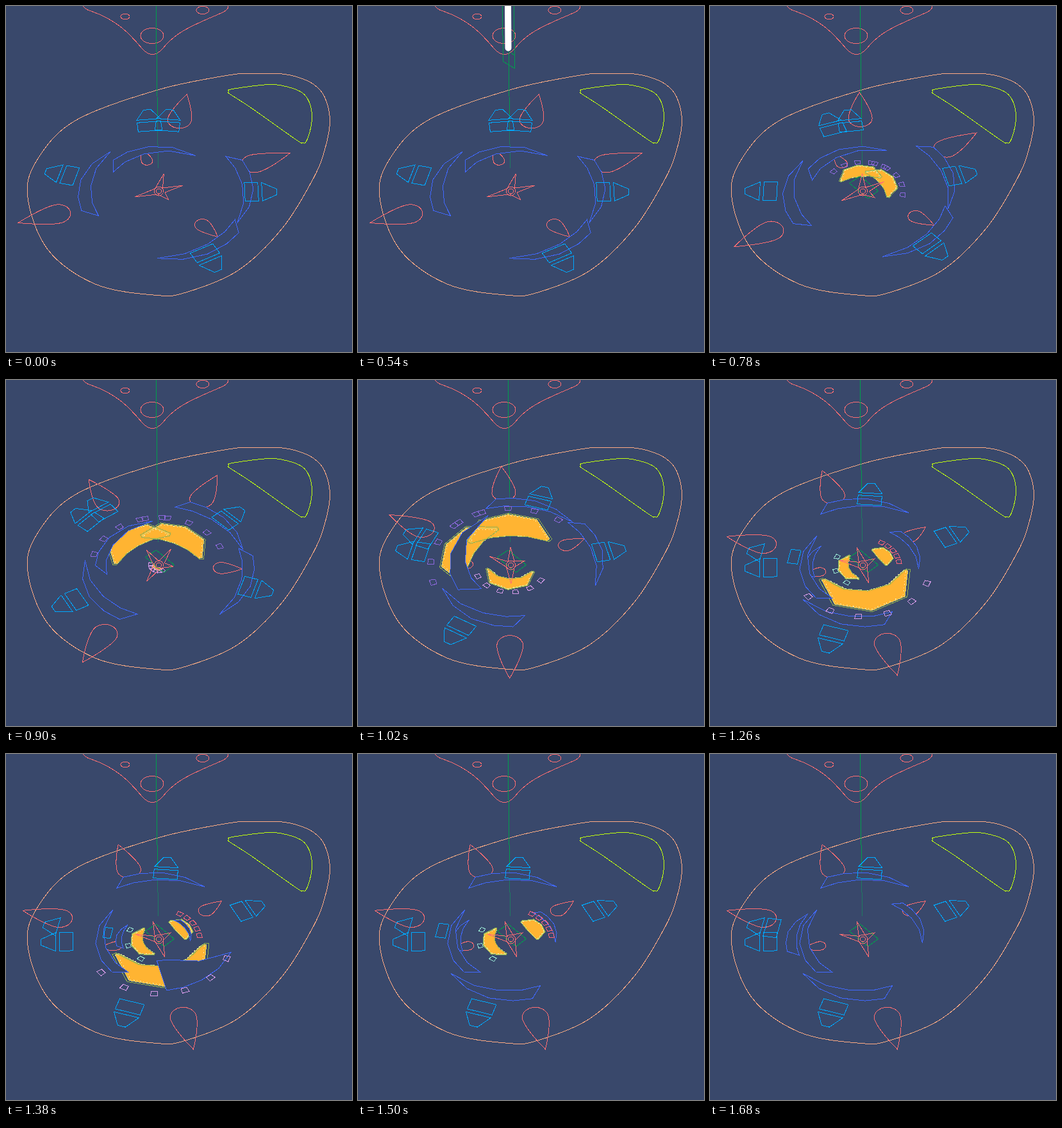
An HTML page for the animation above (2.24 s loop, 540 by 540 pixels).

```html
<!DOCTYPE html>
<html lang="en">
<head>
<meta charset="utf-8">
<title>Ring animation</title>
<style>
html, body { margin: 0; width: 100%; height: 100%; overflow: hidden; background: #39486b; }
svg { display: block; width: 100vw; height: 100vh; }
path, ellipse, circle { fill: none; stroke-width: 1; shape-rendering: crispEdges; }
</style>
</head>
<body>
<svg id="stage" viewBox="-0.5 -0.5 540 540"></svg>
<script>
const LOOP = 2240, START = 540, END = 1680, STEP = 60;
const CX = 238, CY = 288.5, TILT = 0.735, DEPTH = 0.0003;
const BG = '#39486b', ROSE = '#ff6e72', BLUE = '#4169ff', CYAN = '#00a8ff', GREEN = '#00a04c';
const PURPLE = '#8c68dc', PINK = '#d59ae8', MINT = '#94e0d0', RED = '#ff647c';
const stage = document.getElementById('stage');

function add(tag, attrs) {
  const el = document.createElementNS('http://www.w3.org/2000/svg', tag);
  for (const name in attrs) el.setAttribute(name, attrs[name]);
  return stage.appendChild(el);
}
const layer = (stroke, more) => add('path', { stroke, ...more });
const set = (el, d) => el.setAttribute('d', d);
const poly = pts => 'M' + pts.map(p => p[0].toFixed(1) + ' ' + p[1].toFixed(1)).join('L') + 'Z';
const rad = deg => deg * Math.PI / 180;
const mix = (a, b, k) => a + (b - a) * k;
const ramp = (t, from, to) => Math.max(0, Math.min(1, (t - from) / (to - from)));
const bump = (t, peak, width) => Math.max(0, 1 - Math.abs(t - peak) / width);
const smooth = k => k * k * (3 - 2 * k);
const easeOut = k => 1 - (1 - k) ** 2;
const range = n => Array.from({ length: n }, (_, i) => i);

// Closed smooth curve through points
function loopThrough(text) {
  const p = text.split(' ').map(s => s.split(',').map(Number)), n = p.length;
  return p.reduce((d, b, i) => {
    const a = p[(i + n - 1) % n], c = p[(i + 1) % n], e = p[(i + 2) % n];
    return d + 'C' + [b[0] + (c[0] - a[0]) / 6, b[1] + (c[1] - a[1]) / 6,
      c[0] - (e[0] - b[0]) / 6, c[1] - (e[1] - b[1]) / 6, c[0], c[1]];
  }, 'M' + p[0]);
}

// Tilted plane to screen
function project(x, y) {
  const p = 1 + DEPTH * y;
  return [CX + x * p, CY + y * p * TILT];
}
const polar = (r, deg) => project(r * Math.cos(rad(deg)), r * Math.sin(rad(deg)));

// u runs outwards, v sideways, on a spoke at the given angle
function spoke(pts, deg, scale = 1) {
  const c = Math.cos(rad(deg)) * scale, s = Math.sin(rad(deg)) * scale;
  return poly(pts.map(([u, v]) => project(u * c - v * s, u * s + v * c)));
}

// Round inner end, pointed outer end
function teardrop(inner, tip, w) {
  const mid = inner + w, len = tip - mid;
  const cap = range(13).map(i => rad(90 + i * 15)).map(a => [mid + w * Math.cos(a), w * Math.sin(a)]);
  const side = range(9).map(i => (i + 1) / 10).map(k => {
    const j = 1 - k;
    return [mid + len * (0.75 * j * j * k + 2.2 * j * k * k + k ** 3),
      w * (j ** 3 + 3 * j * j * k + 1.2 * j * k * k)];
  });
  return [...cap, ...side.map(([u, v]) => [u, -v]), [tip, 0], ...side.reverse()];
}

// Hook with a point at one end and a slanted cut at the other
function crescent([turn, tip, outer, inner, span], angle, size) {
  const reach = f => Math.sin(rad(90 * Math.min(1, f * 1.3)));
  const edge = (r, length) => [0.28, 0.55, 0.8, 1].map(f =>
    polar(size * mix(tip, r, reach(f)), angle + turn - length * f));
  return poly([polar(size * tip, angle + turn), ...edge(outer, span * 0.87), ...edge(inner, span).reverse()]);
}

// Thick blade between two angles, thinner at both ends
function blade(lo, hi, r) {
  const edge = rule => range(5).map(i => i / 2 - 1).map(s =>
    polar(r * rule(Math.abs(s)), mix(lo, hi, (s + 1) / 2)));
  return [...edge(s => 1 - 0.25 * s ** 3), ...edge(s => 0.57 + 0.12 * s * s).reverse()];
}

// Still parts
add('path', { stroke: '#ffab84', d: loopThrough('387,105 425,105 453,110 480,122 497,142 505,178 498,220 480,267 431,346 362,412 282,446 235,451 140,434 65,380 33,295 51,235 110,177 238,130 350,107') });
add('path', { stroke: '#c0ff10', d: loopThrough('347,133 353,129 410,122 440,126 462,135 473,150 477,170 475,190 468,211 462,213 452,208 380,157 349,137') });
add('path', { stroke: ROSE, d: 'M120 0Q124 5 131 7C175 22 194 45 212 66Q228 84 244 66C262 43 285 32 325 15C337 10 347 6 346 0' });
for (const [cx, cy, rx, ry] of [[227.5, 46, 18, 12], [185.5, 16, 7, 4.5], [306.5, 6, 10, 6]])
  add('ellipse', { stroke: ROSE, cx, cy, rx, ry });
add('path', { stroke: GREEN, d: 'M233.5 -1L236 175' });
add('path', { stroke: '#1f7a62', d: 'M236 175L237 253' });

// Turning parts
const WING = teardrop(143, 225, 19.5), BUD = teardrop(85, 130, 12), DOT = teardrop(59, 97, 9);
const drops = [[WING, 163], [WING, -21.5], [WING, 282], [BUD, 46.5], [DOT, 254]];
const seats = [0.4, 61.3, 193.5, 264, 275.6];
const QUAD = [[134, -19.5], [155, -19.5], [155, 19.5], [134, 19.5]];
const FIN = [[161, -19.5], [184, -6], [184, 6], [161, 19.5]];
const star = [[39, 162], [8, 222], [38, 282], [9, 312], [39, 342], [10, 16], [23, 50], [7, 106]];

// Forms: turn, tip radius, outer radius, inner radius, span
const HOOK = [0, 137, 149, 131, 64], LONG = [0, 116, 126, 106, 77];
const WIDE = [0, 97, 99, 83, 97], TINY = [0, 103, 120, 104, 51];
const BURST = [17, 115, 96, 67, 119], FLIP = [-128, 115, 106, 45, -80];
const crescents = [
  { form: HOOK, angle: 28.8, burst: BURST, peak: 1140 },
  { form: LONG, angle: 228, burst: FLIP, peak: 1380 },
  { form: TINY, angle: 298, pull: 0.44, from: 1080 },
  { form: WIDE, angle: 307, burst: BURST, peak: 1020 },
  { form: HOOK, angle: 91, pull: 0.48, settle: 0.32 }
];
const pulse = t => bump(t, 1380, 270);

// Blades thrown out from the centre, each with a row of chips along its rim
const flares = [
  { lo: 226, hi: 326, r: 114, born: 660, life: 420, end: 1080, chips: 5, color: PURPLE },
  { lo: 291, hi: 390, r: 114, born: 660, life: 420, end: 1200, chips: 5, color: PURPLE },
  { lo: 95, hi: 240, r: 100, born: 870, life: 510, end: 1440, chips: 6, color: PINK },
  { lo: 190, hi: 310, r: 44, born: 1020, life: 360, end: 1500, chips: 3, color: MINT },
  { lo: 21, hi: 85, r: 57, born: 1020, life: 360, end: 1500, chips: 5, color: RED }
];

const dropPath = layer(ROSE);
const flarePath = layer('#d8d873', { style: 'fill:#ffb432' });
const speckPath = layer('#ffe9b0', { 'stroke-dasharray': '2 4 1 3' });
const rimPath = layer('#8fb052');
const bluePaths = crescents.map(() => layer(BLUE, { style: 'fill:' + BG }));
const chipPaths = flares.map(f => layer(f.color));
const cyanPath = layer(CYAN);
const boxPath = layer(GREEN);
const starPath = layer(ROSE);
for (const r of [7, 4]) add('circle', { stroke: ROSE, cx: CX, cy: CY, r });
const beamBox = layer(GREEN);
const beam = layer('#fff', { style: 'stroke-width:10;stroke-linecap:round;shape-rendering:auto' });

function scaled(pts, k) {
  const [x, y] = [0, 1].map(i => pts.reduce((sum, p) => sum + p[i], 0) / pts.length);
  return poly(pts.map(p => [mix(x, p[0], k), mix(y, p[1], k)]));
}

function chipRow({ lo, hi, chips }, r, spin) {
  const u = r * 1.12, h = 3 + r * 0.015;
  const chip = [[u - h, -h], [u + h, -h - 1], [u + h, h + 1], [u - h, h]];
  return range(chips).map(i => spoke(chip, mix(lo, hi, (i + 0.5) / chips) + spin)).join('');
}

function drawFlares(t, spin) {
  const lit = [];
  flares.forEach((f, i) => {
    const live = t > f.born && t <= f.end;
    const r = f.r * easeOut(ramp(t, f.born, f.born + f.life));
    if (live) lit.push(blade(f.lo + spin, f.hi + spin, r));
    set(chipPaths[i], live ? chipRow(f, r, spin) : '');
  });
  const outline = k => lit.map(pts => scaled(pts, k)).join('');
  set(flarePath, outline(1));
  set(speckPath, outline(0.95));
  set(rimPath, outline(1.06));
}

function drawBeam(t) {
  const falling = t >= START && t < 660, y = t >= 600 ? 180 : 0;
  set(beam, falling ? `M233 ${y - 70}L234 ${y + 65}` : '');
  set(beamBox, falling ? `M224 ${y - 80}L226 ${y + 86}L244 ${y + 97}L242 ${y - 80}M238 ${y + 72}L244 ${y + 77}` : '');
  set(boxPath, t >= 660 ? 'M217 276L234 265L262 288L246 300Z' : '');
}

function draw(t) {
  const spin = -86 * smooth(ramp(t, 660, 1140));
  set(dropPath, drops.map(([pts, angle]) => spoke(pts, angle + spin)).join(''));
  set(starPath, poly(star.map(([r, a]) => polar(r, a + spin))));
  set(cyanPath, seats.map((a, i) =>
    spoke(QUAD, a + spin, i === 4 ? 1 - 0.44 * pulse(t) : 1) + spoke(FIN, a + spin)).join(''));
  crescents.forEach(({ form, angle, burst = form, peak = 0, pull = 0, settle = 0, from = 0 }, i) => {
    const k = bump(t, peak, 120);
    const size = 1 - pull * pulse(t) - settle * ramp(t, 1080, END);
    const now = form.map((v, n) => mix(v, burst[n], k));
    set(bluePaths[i], t < from ? '' : crescent(now, angle + spin, size));
  });
  drawFlares(t, spin);
  drawBeam(t);
}

const begin = performance.now();
let shown = -1;
function tick() {
  const now = (performance.now() - begin) % LOOP;
  const t = now < START ? 0 : Math.min(END, Math.floor(now / STEP) * STEP);
  if (t !== shown) draw(shown = t);
  requestAnimationFrame(tick);
}
tick();
</script>
</body>
</html>
```
